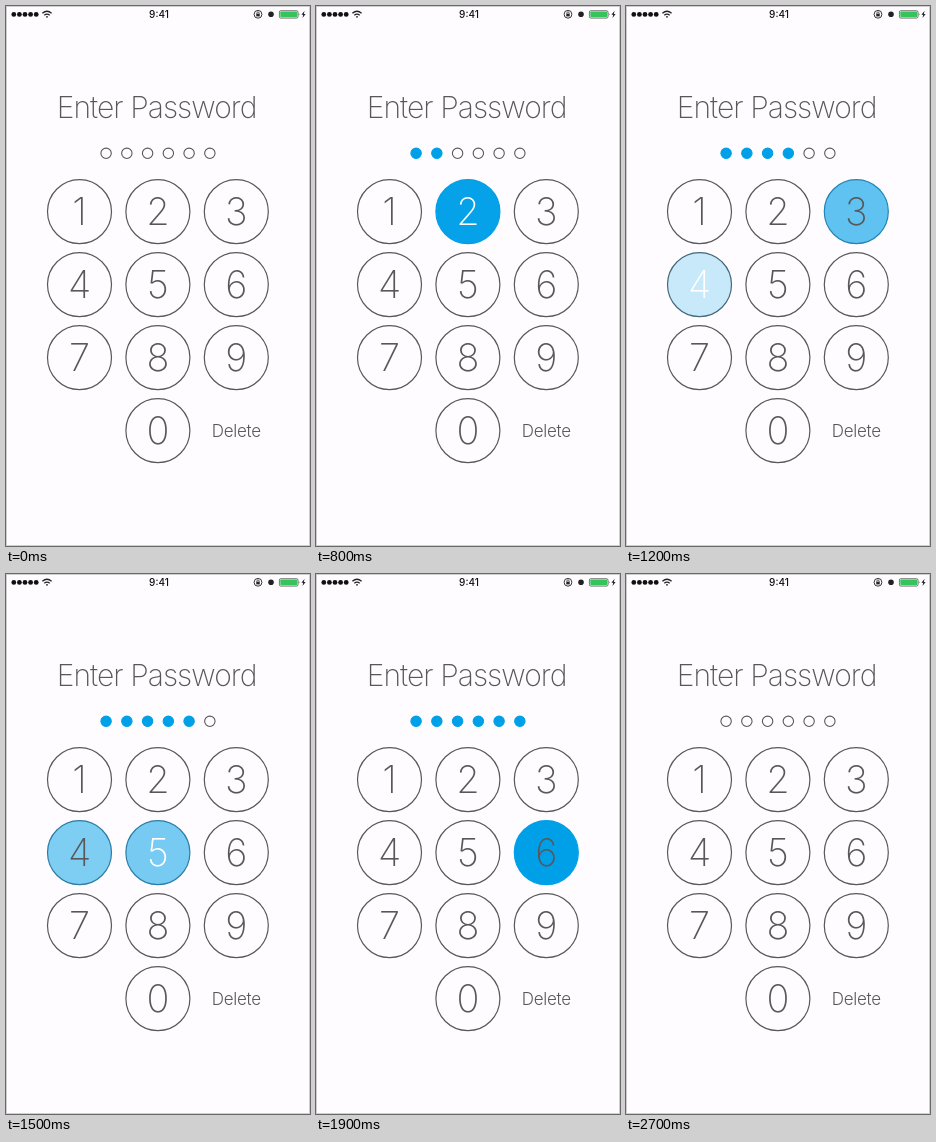
An HTML page for the animation above (3100 ms loop, 304 by 540 pixels).

```html
<!DOCTYPE html>
<html lang="en">
<head>
<meta charset="utf-8">
<title>Passcode screen</title>
<style>
  html, body { margin: 0; width: 100%; height: 100%; overflow: hidden; background: #fefcfe; }
  svg { display: block; width: 100%; height: 100%; }
  text { font-family: Inter, Roboto, sans-serif; fill: #58585c; text-anchor: middle; }
  .title { font-size: 30px; font-weight: 200; letter-spacing: -0.95px; }
  .digit { font-size: 38px; font-weight: 200; }
  .delete { font-size: 17px; font-weight: 300; letter-spacing: -0.25px; }
  .clock { font-size: 10px; font-weight: 500; fill: #111; }
  .key { stroke-width: 1.2; }
  .dot { fill: none; stroke: #58585c; stroke-width: 1.1; }
  .dot.full { fill: #00a0e9; stroke: #00a0e9; }
  .icon { fill: none; stroke: #222; }
</style>
</head>
<body>
<svg viewBox="0 0 304 540">
  <rect width="304" height="540" fill="#fefcfe"/>
  <rect x=".5" y=".5" width="303" height="539" fill="none" stroke="#cfcdcf"/>

  <g id="signal" fill="#111"></g>
  <g class="icon" stroke-width="1.3">
    <path d="M36.4 7.2Q41 3.2 45.6 7.2M38.3 9.2Q41 6.9 43.7 9.2"/>
    <circle cx="41" cy="10.8" r=".9" fill="#222" stroke="none"/>
  </g>
  <text class="clock" x="153" y="12">9:41</text>
  <g class="icon" stroke-width=".9">
    <circle cx="252" cy="8.3" r="3.9"/>
    <rect x="250.3" y="7.8" width="3.4" height="2.6" fill="#222" stroke="none"/>
    <path d="M250.9 8V7a1.1 1.1 0 0 1 2.2 0v1" stroke-width=".7"/>
  </g>
  <circle cx="265" cy="8.3" r="2.8" fill="#222"/>
  <rect class="icon" x="273.4" y="4.7" width="18.6" height="7.4" rx="1.4" stroke-width=".6"/>
  <rect x="274.3" y="5.6" width="16.8" height="5.6" rx=".7" fill="#35c45c"/>
  <path d="M292.8 7.1q1.3 1.3 0 2.6z" fill="#222"/>
  <path d="M298.6 4.8l-3.2 4h1.8l-.7 3.2 3.1-4.1h-1.8z" fill="#222"/>

  <text class="title" x="150.6" y="112">Enter Password</text>
  <g id="dots"></g>
  <g id="keys"></g>
  <text class="delete" x="230.3" y="431">Delete</text>
</svg>

<script>
const LOOP = 3100, STEP = 100, FADE = 250;
const INK = [88, 88, 92], BLUE = [0, 160, 233];
const PRESSES = [145, 570, 845, 1125, 1370, 1650]; // keys 1 to 6
const SHAKE_AT = 1950, CLEAR_AT = 2450;
const SHAKE = [[0, 0], [50, 4], [150, -8], [250, 8], [350, -8], [450, 8], [500, -4], [550, 0]];

const byId = id => document.getElementById(id);

function add(parent, tag, attrs, text = '') {
  const el = document.createElementNS('http://www.w3.org/2000/svg', tag);
  for (const name in attrs) el.setAttribute(name, attrs[name]);
  el.textContent = text;
  return parent.appendChild(el);
}

function addKey(n) {
  const col = n ? (n - 1) % 3 : 1;
  const row = n ? Math.floor((n - 1) / 3) : 3;
  const x = 73.5 + col * 78.4, y = 205.6 + row * 73;
  const disc = add(byId('keys'), 'circle', { class: 'key', cx: x, cy: y, r: 32 });
  const label = add(byId('keys'), 'text', { class: 'digit', x, y: y + 13.8 }, n);
  return { disc, label };
}

for (let i = 0; i < 5; i++) add(byId('signal'), 'circle', { cx: 7.8 + i * 5.6, cy: 8.4, r: 2.4 });
const dots = PRESSES.map((_, i) =>
  add(byId('dots'), 'circle', { class: 'dot', cx: 100.1 + i * 20.75, cy: 147.3, r: 5.2 }));
const keys = Array.from({ length: 10 }, (_, n) => addKey(n));

const ease = p => {
  p = Math.min(1, Math.max(0, p));
  return p * p * (3 - 2 * p);
};

function shakeX(t) {
  for (let i = 1; i < SHAKE.length; i++) {
    const [t0, x0] = SHAKE[i - 1], [t1, x1] = SHAKE[i];
    if (t <= t1) return x0 + (x1 - x0) * ease((t - t0) / (t1 - t0));
  }
  return 0;
}

function drawKey({ disc, label }, age) {
  const a = ease(age / FADE) - ease((age - FADE) / FADE);
  const rim = INK.map((c, i) => Math.round(c + (BLUE[i] - c) * a));
  disc.style.fill = `rgba(${BLUE}, ${a})`;
  disc.style.stroke = `rgb(${rim})`;
  // The digit switches at once; only the disc fades.
  label.style.fill = age >= 0 && age < FADE ? '#fff' : `rgb(${INK})`;
}

function draw(now) {
  const t = Math.floor((now % LOOP) / STEP) * STEP;
  keys.forEach((key, n) => drawKey(key, n >= 1 && n <= 6 ? t - PRESSES[n - 1] : -1));
  dots.forEach((dot, i) => dot.classList.toggle('full', t >= PRESSES[i] && t < CLEAR_AT));
  byId('dots').setAttribute('transform', `translate(${shakeX(t - SHAKE_AT)} 0)`);
}

function tick() {
  draw(performance.now());
  requestAnimationFrame(tick);
}
tick();
</script>
</body>
</html>
```
